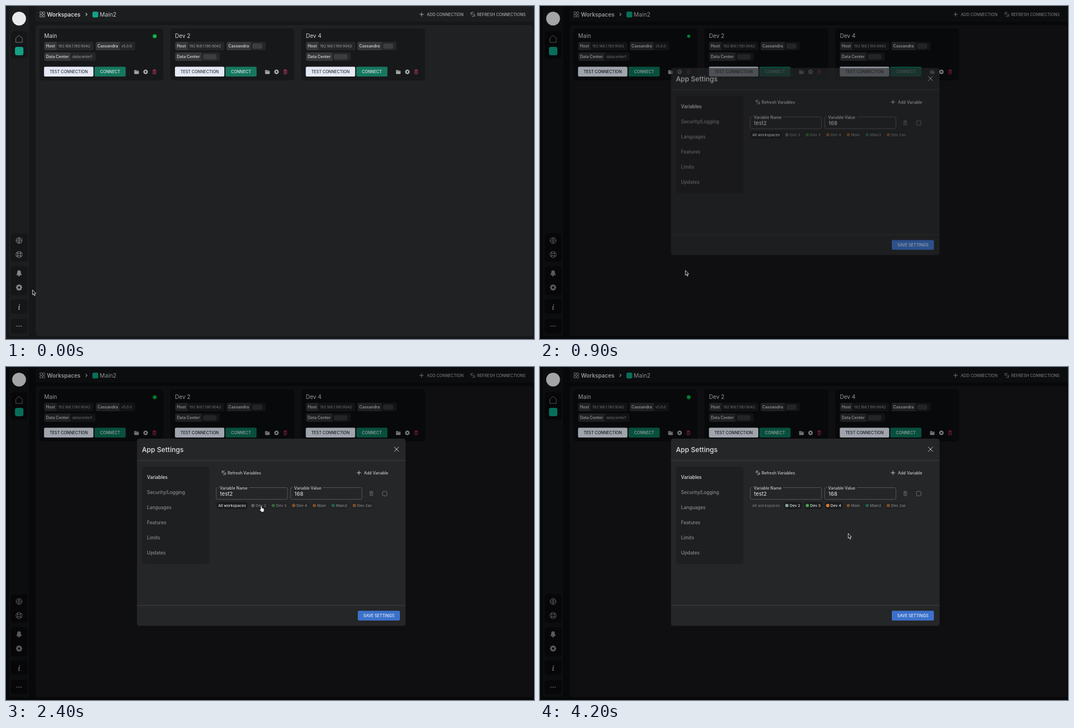
An HTML page with a canvas for the animation above (4.4 s loop, 941x595 px).

```html
<!DOCTYPE html>
<html lang="en">
<head>
<meta charset="utf-8">
<title>Workspace settings</title>
<style>
html, body { margin: 0; width: 100%; height: 100%; overflow: hidden; background: #161719; }
canvas { display: block; width: 941px; height: 595px; }
</style>
</head>
<body>
<canvas id="stage" width="941" height="595"></canvas>
<script>
const W = 941, H = 595, LOOP = 4400, STEP = 100, TAU = Math.PI * 2;
const screen2d = document.getElementById('stage').getContext('2d');
const layer = document.createElement('canvas');
layer.width = W;
layer.height = H;
const layer2d = layer.getContext('2d');
let g = screen2d;

// ---- helpers ----
const ramp = (t, from, to) => Math.min(1, Math.max(0, (t - from) / (to - from)));
const easeOut = (k, power) => 1 - (1 - k) ** power;

function paint(fill, stroke, lw = 1) {
  if (fill) { g.fillStyle = fill; g.fill(); }
  if (stroke) { g.strokeStyle = stroke; g.lineWidth = lw; g.stroke(); }
}
function box(x, y, w, h, r, fill, stroke, lw) {
  g.beginPath();
  g.roundRect(x, y, w, h, r);
  paint(fill, stroke, lw);
}
function disc(x, y, r, fill, stroke, lw) {
  g.beginPath();
  g.arc(x, y, r, 0, TAU);
  paint(fill, stroke, lw);
}
function poly(points, fill, stroke, lw) {
  g.beginPath();
  points.forEach(([x, y]) => g.lineTo(x, y));
  g.closePath();
  paint(fill, stroke, lw);
}
function line(x1, y1, x2, y2, color, lw = 1) {
  g.beginPath();
  g.moveTo(x1, y1);
  g.lineTo(x2, y2);
  paint(null, color, lw);
}
// Draws text centred on cy and returns its width.
function text(s, x, cy, size, color, weight = 400, align = 'left') {
  g.font = `${weight} ${size}px Inter, sans-serif`;
  g.textAlign = align;
  g.fillStyle = color;
  g.fillText(s, x, cy + size * 0.364);
  return g.measureText(s).width;
}
function textWidth(s, size, weight) {
  g.font = `${weight} ${size}px Inter, sans-serif`;
  return g.measureText(s).width;
}
function button(label, x, y, w, fill, color) {
  box(x, y, w, 17.5, 2, fill);
  text(label, x + w / 2, y + 8.8, 7.1, color, 500, 'center');
}
function at(x, y, draw) {
  g.save();
  g.translate(x, y);
  draw();
  g.restore();
}

// ---- icons ----
function spokes(n, from, to, color, lw, turn = 0) {
  for (let i = 0; i < n; i++) {
    const a = turn + i * TAU / n, c = Math.cos(a), s = Math.sin(a);
    line(c * from, s * from, c * to, s * to, color, lw);
  }
}
function gear(x, y, r, color) {
  at(x, y, () => {
    disc(0, 0, r * 0.62, null, color, r * 0.5);
    spokes(8, r * 0.7, r, color, r * 0.4);
  });
}
function trash(x, y, color) {
  at(x, y, () => {
    line(-3.3, -3, 3.3, -3, color);
    line(-1.2, -4, 1.2, -4, color);
    box(-2.4, -2, 4.8, 5.8, 0.8, null, color);
    for (const dx of [-0.8, 0.8]) line(dx, -1, dx, 2.8, color, 0.7);
  });
}
function folder(x, y) {
  box(x - 4, y - 3.5, 4, 3, 0.8, '#a9aaac');
  box(x - 4, y - 2.6, 8.2, 6, 0.8, '#a9aaac');
  line(x - 4, y - 1, x + 4.2, y - 1, '#515254', 0.7);
}
function plus(x, y, color) {
  at(x, y, () => spokes(4, 0, 3.7, color, 1));
}
function refresh(x, y, r, color) {
  at(x, y, () => {
    for (const turn of [0, Math.PI]) {
      g.rotate(turn);
      g.beginPath();
      g.arc(0, 0, r * 0.85, 0.1, 2);
      paint(null, color, 0.8);
      line(r * 0.85, 0.4, r * 0.4, -r * 0.2, color, 0.8);
    }
    line(-r * 0.9, -r * 0.9, r * 0.9, r * 0.9, color, 0.8);
  });
}
function sideIcons(gearHot) {
  const c = '#858688', x = 23.3;
  poly([[x - 5.8, 57.5], [x, 52.5], [x + 5.8, 57.5], [x + 5.8, 65], [x - 5.8, 65]], null, '#77787a');
  box(16, 73, 15, 15, 3.5, '#15a085');
  at(x, 419, () => {
    disc(0, 0, 5.3, null, c);
    spokes(4, 0, 5.3, c, 0.9);
    for (const dy of [-2.6, 2.6]) line(-3.2, dy, 3.2, dy, c, 0.8);
  });
  at(x, 444, () => {
    disc(0, 0, 5.5, null, c);
    disc(0, 0, 2.6, null, c);
    spokes(4, 2.6, 5.5, c, 1.5, TAU / 8);
  });
  at(x, 477.5, () => {
    g.beginPath();
    g.moveTo(-5, 3.2);
    g.bezierCurveTo(-1.5, -1, -5, -5.2, 0, -5.2);
    g.bezierCurveTo(5, -5.2, 1.5, -1, 5, 3.2);
    g.closePath();
    paint(c);
    disc(0, 4, 1.6, c);
  });
  gear(x, 503, 5.6, gearHot ? '#d2d3d5' : c);
  g.font = 'italic 700 13px "Noto Serif", serif';
  g.textAlign = 'center';
  g.fillStyle = c;
  g.fillText('i', x, 542.5);
  for (const dx of [-3.8, 0, 3.8]) disc(x + dx, 572, 1.1, c);
}

// ---- page ----
// A numeric value stands for an empty placeholder of that width.
function tag(x, y, label, value) {
  const known = typeof value === 'string';
  const split = textWidth(label, 7.1, 600) + 6;
  const w = split + 9 + (known ? textWidth(value, 6.5, 400) : value);
  box(x, y, w, 15, 3, '#252627');
  box(x, y, split, 15, [3, 0, 0, 3], '#363739');
  text(label, x + 3, y + 7.5, 7.1, '#cbccce', 600);
  if (known) text(value, x + split + 3, y + 7.5, 6.5, '#a0a1a3');
  else box(x + split + 3, y + 3, value, 9.5, 3, '#3c3d3f');
  return x + w + 4;
}
function card(x, title, version = 18, center = 24) {
  box(x, 40, 221, 93, 5, '#17181a');
  text(title, x + 8.5, 53.7, 10, '#d8d9db');
  const next = tag(x + 8.7, 64, 'Host', '192.168.1.190:9042');
  tag(next, 64, 'Cassandra', version);
  tag(x + 8.7, 83, 'Data Center', center);
  button('TEST CONNECTION', x + 8.3, 108.4, 88, '#e4e9f5', '#2d2f33');
  button('CONNECT', x + 98.3, 108.4, 55.5, '#17775f', '#d9e9e4');
  folder(x + 173, 118);
  gear(x + 189.3, 117.7, 4.2, '#b1b2b4');
  trash(x + 205, 117.7, '#b0344e');
}
function statusDot(t) {
  const p = ramp(t % 2000, 0, 720);
  if (p < 1) disc(265, 54, 4 + p * 0.5, `rgba(16,150,62,${0.65 - p * 0.3})`);
  disc(265, 54, 2.8, '#12bd50');
}
function page(t) {
  g.fillStyle = '#161719';
  g.fillRect(0, 0, W, H);
  box(5, 0, 36, 590, 5, '#1c1d1f');
  box(53, 0, 888, 28, [0, 0, 0, 5], '#1c1d1f');
  box(53, 34, 886.5, 556, 5, '#202123');
  for (const [y, h] of [[45, 49], [406, 51], [465, 52], [524, 26], [559, 26]])
    box(8.5, y, 30, h, 5, '#151618');
  disc(23.3, 22.5, 12.3, '#e9eaec');
  sideIcons(t >= 200 && t < 800);

  for (const x of [60.5, 65.5])
    for (const y of [10.5, 15.8]) box(x, y, 3.6, 3.8, 0.5, null, '#a5a6a8', 0.9);
  text('Workspaces', 73, 15, 9.9, '#d8d9db', 600);
  for (const dy of [-2.6, 2.6]) line(141.8, 15 + dy, 144.6, 15, '#bcbdbf', 1.1);
  box(154, 10, 10.5, 10.5, 2.5, '#15a085');
  text('Main2', 167, 15.2, 10.2, '#cacbcd');
  const tool = '#a9aaac';
  plus(740.7, 15, tool);
  text('ADD CONNECTION', 750, 15, 7.1, tool, 500);
  refresh(832, 15, 4.4, tool);
  text('REFRESH CONNECTIONS', 839.7, 15, 7.1, tool, 500);

  card(59.5, 'Main', 'v5.0.0', 'datacenter1');
  card(292.8, 'Dev 2');
  card(526, 'Dev 4');
  statusDot(t);
}
function tooltip(t) {
  g.globalAlpha = 0.8 * (ramp(t, 200, 400) - ramp(t, 500, 760));
  box(47, 494.5, 41, 17, 3, '#111214');
  text('Settings', 67.5, 503, 7.6, '#d8d9db', 400, 'center');
  g.globalAlpha = 1;
}
// Darkens the page; the difference pass also lowers its black level.
function dim(t) {
  const k = ramp(t, 600, 800), cut = Math.round(8.5 * k * k);
  g.fillStyle = `rgba(0,0,0,${0.26 * easeOut(k, 2)})`;
  g.fillRect(0, 0, W, H);
  g.globalCompositeOperation = 'difference';
  g.fillStyle = `rgb(${cut},${cut},${cut})`;
  g.fillRect(0, 0, W, H);
  g.globalCompositeOperation = 'source-over';
}

// ---- settings window ----
function field(x, label, value) {
  box(x, 215.5, 127, 21, 2.5, null, '#545557');
  g.fillStyle = '#252627';
  g.fillRect(x + 4, 214, textWidth(label, 7.1, 500) + 5, 3);
  text(label, x + 6.3, 216, 7.1, '#c9cacc', 500);
  text(value, x + 6.8, 226.2, 9.6, '#e4e5e7');
}
const chips = ['Dev 2', 'Dev 3', 'Dev 4', 'Main', 'Main2', 'Dev 2as'];
const chipColors = ['#8fa09f', '#3fa54a', '#e07b28', '#d5762a', '#16a085', '#d5762a'];
const picks = [2500, 2900, 3400];
function chipRow(t) {
  const all = t < picks[0];
  const latest = t < 4200 ? picks.filter(p => t >= p).length - 1 : -1;
  if (all) box(375, 241, 55.5, 13, 5, '#1a1b1d');
  text('All workspaces', 378.3, 247.5, 6.75, all ? '#e0e1e3' : '#77787a', 500);
  let x = 440;
  chips.forEach((name, i) => {
    const on = t >= picks[i], w = textWidth(name, 6.8, 500);
    g.globalAlpha = on ? 1 : 0.5;
    box(x - 5, 241, w + 13, 13, 5, on ? '#1a1b1d' : '#202123');
    if (i === latest) box(x + 4, 241.5, 11, 12, 5, '#414244');
    disc(x, 247.6, 3, chipColors[i]);
    text(name, x + 5, 247.5, 6.8, '#e0e1e3', 500);
    x += w + 17.7;
  });
  g.globalAlpha = 1;
}
function settings(t) {
  const soft = '#c9cacc';
  box(233.5, 128, 478.5, 334.5, 4, '#252627');
  text('App Settings', 242.3, 147.2, 12.1, '#e2e3e5', 500);
  at(696, 147, () => spokes(4, 0, 5.8, soft, 1, TAU / 8));
  for (const y of [167, 426]) line(233.5, y, 712, y, '#3d3e40', 1.2);

  box(242.5, 178, 120, 174, 5, '#1e1f21');
  ['Variables', 'Security/Logging', 'Languages', 'Features', 'Limits', 'Updates'].forEach((s, i) =>
    text(s, 251.3, 197 + i * 27.05, 8.3, i ? '#88898b' : '#dddee0', 500));

  refresh(388.3, 189, 4, soft);
  text('Refresh Variables', 395, 189, 7.1, soft, 500);
  plus(629, 189, soft);
  text('Add Variable', 638, 189, 7.1, soft, 500);
  field(374.7, 'Variable Name', 'test2');
  field(507.3, 'Variable Value', '168');
  trash(651, 226, '#656668');
  box(671, 222.2, 8, 8, 1.5, null, '#6d6e70');
  chipRow(t);
  button('SAVE SETTINGS', 627, 435.5, 75, '#3b71ca', '#e6edf8');
}
function settingsLayer(t) {
  g = layer2d;
  g.clearRect(0, 0, W, H);
  settings(t);
  g = screen2d;
  g.globalAlpha = ramp(t, 700, 1000);
  g.drawImage(layer, 0, -50 * (1 - easeOut(ramp(t, 700, 1100), 1.52)));
  g.globalAlpha = 1;
}

// ---- pointer ----
const moves = [
  { from: 0, to: 400, x: 23, y: 502 },
  { from: 500, to: 1100, x: 263, y: 470 },
  { from: 1100, to: 1500, x: 555, y: 272 },
  { from: 1500, to: 2400, x: 455, y: 249 },
  { from: 2800, to: 2900, x: 487, y: 249 },
  { from: 2900, to: 3000, x: 513.5, y: 248.5 },
  { from: 3500, to: 3600, x: 549, y: 297 }
];
// Sideways motion settles sooner than vertical motion.
function pointerAt(t) {
  let x = 47, y = 507;
  for (const m of moves) {
    const k = ramp(t, m.from, m.to);
    x += (m.x - x) * easeOut(k, 3.7);
    y += (m.y - y) * easeOut(k, 2.5);
  }
  return [x, y];
}
function arrow() {
  poly([[0.3, 0.3], [0.3, 9], [2.2, 7.3], [3.6, 10.6], [5, 10], [3.6, 6.8], [6.2, 6.7]],
    '#0a0a0a', '#e8e8e8', 0.9);
}
function hand() {
  const parts = () => {
    g.roundRect(-0.9, -0.2, 1.8, 7, 0.9);
    g.roundRect(-0.9, 3.4, 5.6, 6.4, 1.8);
    g.roundRect(-2.5, 5.6, 3.5, 2, 1);
  };
  g.beginPath();
  parts();
  paint(null, '#111', 1.2);
  paint('#f0f0f0');
}
function pointer(t) {
  const over = (t >= 200 && t < 600) || (t >= 2000 && t < 3600);
  at(...pointerAt(t), over ? hand : arrow);
}

function render(t) {
  page(t);
  tooltip(t);
  dim(t);
  settingsLayer(t);
  pointer(t);
}

let last = -1;
const start = performance.now();
function tick() {
  const t = Math.floor(((performance.now() - start) % LOOP) / STEP) * STEP;
  if (t !== last) render(last = t);
  requestAnimationFrame(tick);
}
tick();
</script>
</body>
</html>
```
